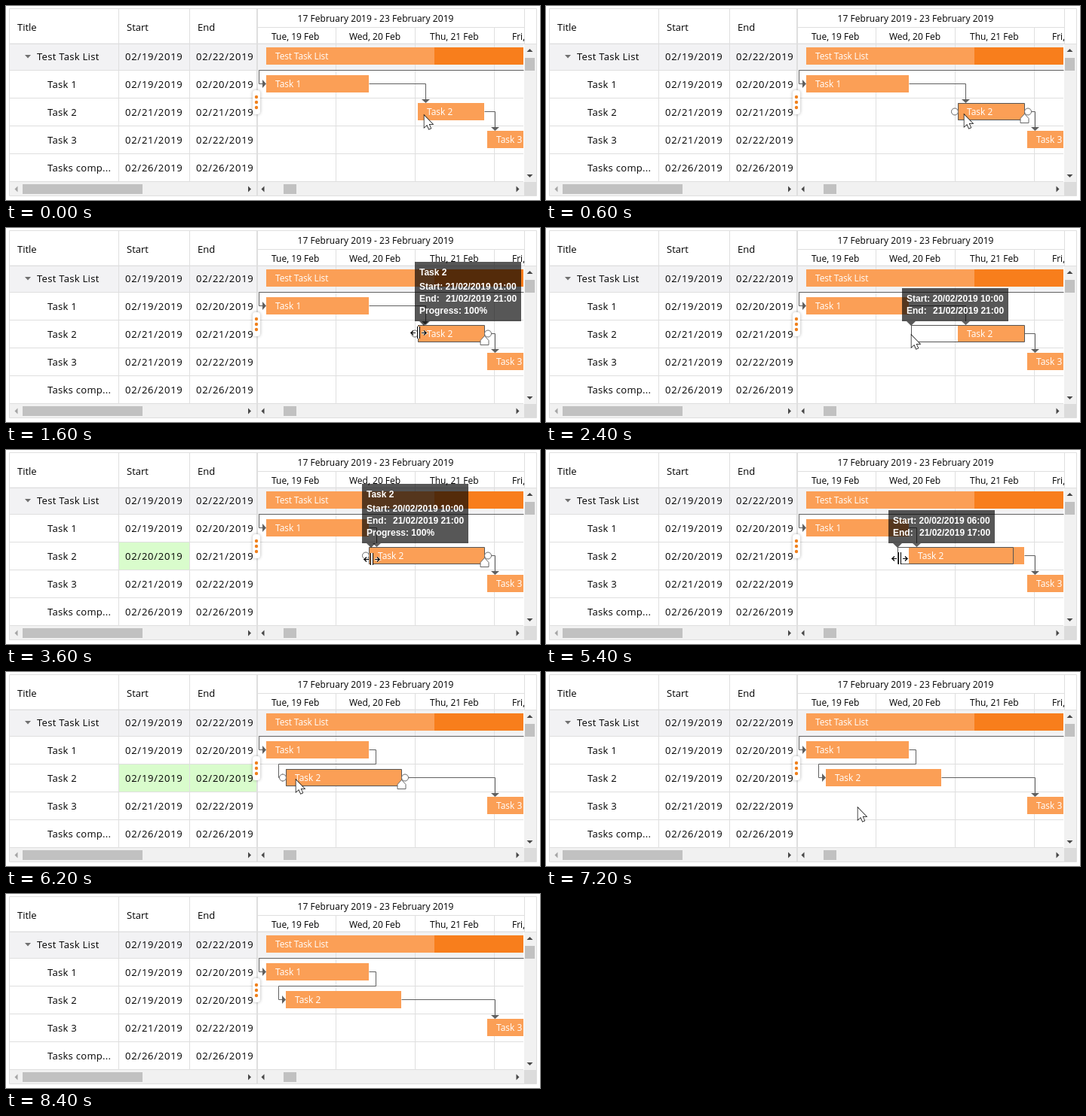
Recreate the animation shown at these times as an HTML page with a canvas. Size 708 by 258 pixels, loop 9200 ms.

```html
<!DOCTYPE html>
<html>
<head>
<meta charset="utf-8">
<style>
html, body { margin: 0; overflow: hidden; background: #fff; }
canvas { display: block; }
</style>
</head>
<body>
<canvas id="stage" width="708" height="258"></canvas>
<script>
const c = document.getElementById('stage').getContext('2d');
const LOOP = 9200, STEP = 200;
const UI = '"Open Sans", "Noto Sans", sans-serif';
const INK = '#000', LINE = '#dfdfdf', LINK = '#606060', LIGHT = '#fb9f56', DARK = '#f87e1c';

// Hours are counted from 19 February 00:00
const X = h => 331.5 + 4.385 * h;
const day = h => 19 + Math.floor(h / 24);
const pad = n => String(n).padStart(2, '0');
const gridDate = h => `02/${day(h)}/2019`;
const tipDate = h => `${day(h)}/02/2019 ${pad(Math.floor(h + 1e-6) % 24)}:00`;
const within = (t, a, b) => t >= a && t < b;

// Linear interpolation through [time, value, value...] points
function track(t, pts) {
  let i = 0;
  while (i < pts.length - 2 && t >= pts[i + 1][0]) i++;
  const p = pts[i], q = pts[i + 1];
  const k = Math.max(0, Math.min(1, (t - p[0]) / (q[0] - p[0])));
  return p.slice(1).map((v, n) => v + (q[n + 1] - v) * k);
}

const mouse = [
  [0, 554, 145], [800, 554, 143], [1400, 547, 139], [1600, 547, 139],
  [2000, 528, 140], [2400, 484, 142], [3000, 484, 143], [3600, 485, 145],
  [5000, 484, 145], [5400, 469, 144], [5800, 378, 143], [6200, 384, 143],
  [6400, 384, 144], [6800, 413, 180]
];
const resize = [[1600, 49], [2000, 44.5], [2400, 34.78]];
const move = [[5000, 34], [5400, 30.67], [5800, 9.8]];

function rect(x, y, w, h, fill) {
  c.fillStyle = fill;
  c.fillRect(x, y, w, h);
}

function text(s, x, y, font, fill, spacing = 0) {
  c.font = font;
  c.letterSpacing = spacing + 'px';
  c.fillStyle = fill;
  c.fillText(s, x, y);
}

function path(pts) {
  c.beginPath();
  pts.forEach(p => c.lineTo(p[0], p[1]));
}

function fill(color) {
  c.fillStyle = color;
  c.fill();
}

function stroke(color, width = 1) {
  c.strokeStyle = color;
  c.lineWidth = width;
  c.stroke();
}

// Triangle with its tip at x, y, pointing along dx, dy
function arrow(x, y, dx, dy, len, half, color) {
  const bx = x - dx * len, by = y - dy * len;
  path([[x, y], [bx + dy * half, by + dx * half], [bx - dy * half, by - dx * half]]);
  fill(color);
}

function link(pts) {
  path(pts.map(p => [p[0] + .5, p[1] + .5]));
  stroke(LINK);
}

function bar(from, to, y, label) {
  const x = Math.round(X(from));
  rect(x, y, Math.round(X(to)) - x, 23, LIGHT);
  text(label, x + 12, y + 16, '12px ' + UI, '#fff');
}

function outline(from, to) {
  const x = Math.round(X(from));
  c.beginPath();
  c.rect(x + .5, 129.5, Math.round(X(to)) - x, 22);
  stroke('#555');
}

function handles(from, to) {
  const l = Math.round(X(from)), r = Math.round(X(to));
  outline(from, to);
  for (const x of [l - 4, r + 5]) {
    c.beginPath();
    c.arc(x, 140.5, 4.5, 0, 7);
    fill('#fff');
    stroke('#666');
  }
  const m = r + .5;
  path([[m, 143.5], [m + 5.5, 149.5], [m + 5.5, 155.5], [m - 5.5, 155.5], [m - 5.5, 149.5]]);
  c.closePath();
  fill('#fff');
  stroke('#666');
}

function tooltip(x, from, to, full) {
  const left = Math.round(x) - 12, top = full ? 45 : 80;
  const bold = '600 12px "Liberation Sans", Arial, sans-serif';
  const shade = 'rgba(0,0,0,.66)';
  const put = (s, dx, y) => text(s, left + dx, y, bold, '#fff');
  rect(left, top, 141, 124 - top, shade);
  arrow(left + 12, 130, 0, 1, 6, 6, shade);
  const y = full ? 82 : 98, next = full ? 98 : 114;
  if (full) {
    put('Task 2', 6, 63);
    put('Progress: 100%', 6, 114);
  }
  put('Start:', 6, y);
  put(tipDate(from), 40.5, y);
  put('End:', 6, next);
  put(tipDate(to), 41, next);
}

function pointer(x, y) {
  const pts = [[0, 0], [0, 16], [3.7, 12.6], [6.3, 18.3], [8.8, 17.2], [6.3, 11.6], [11.2, 11.6]];
  path(pts.map(p => [x + p[0] + .5, y + p[1] + .5]));
  c.closePath();
  stroke('#000', 1.4);
  fill('#fff');
}

function resizer(x, y) {
  rect(x - 2, y - 8, 4, 16, '#fff');
  rect(x - 2, y - 8, 1, 16, '#000');
  rect(x + 1, y - 8, 1, 16, '#000');
  for (const d of [-1, 1]) {
    path([[4, 0], [10, 0], [7, -3], [10, 0], [7, 3]].map(p => [x + d * p[0], y + p[1] + .5]));
    stroke('#fff', 2.4);
    stroke('#000', 1.2);
  }
}

function grid(start, end, green, greenEnd) {
  rect(5, 49, 682, 36, '#f2f2f4');
  if (green > 0) {
    c.globalAlpha = green;
    rect(150, 123, greenEnd ? 182 : 93, 36, '#d9fccc');
    c.globalAlpha = 1;
  }
  for (const y of [85, 122, 159, 196, 233]) rect(5, y, 682, 1, LINE);
  rect(5, 50, 698, 1, LINE);
  for (const x of [149, 243]) rect(x, 4, 1, 230, LINE);

  const font = '13px ' + UI;
  [['Title', 15], ['Start', 160], ['End', 254]].forEach(h => text(h[0], h[1], 33, font, INK));
  const rows = [
    ['Test Task List', 0, 72], ['Task 1', 3, 34], ['Task 2', start, end],
    ['Task 3', 70, 72], ['Tasks comp...', 168, 168]
  ];
  rows.forEach(([name, a, b], i) => {
    const y = 72 + 37 * i;
    text(name, i ? 55 : 41, y, font, INK, .3);
    text(gridDate(a), 158, y, font, INK, .75);
    text(gridDate(b), 252, y, font, INK, .75);
  });
  arrow(29, 69.5, 0, 1, 4.5, 4, '#707070');
}

function chart(start, end) {
  c.save();
  c.beginPath();
  c.rect(333, 4, 354, 230);
  c.clip();
  rect(333, 28, 354, 1, LINE);
  for (const x of [437, 542, 647]) rect(x, 28, 1, 206, LINE);
  const font = '12px ' + UI;
  text('17 February 2019 - 23 February 2019', 386.5, 21, font, INK, .05);
  [['Tue, 19', 352], ['Wed, 20', 455], ['Thu, 21', 562], ['Fri, 22', 671]]
    .forEach(d => text(d[0] + ' Feb', d[1], 45, font, INK));

  rect(345, 55, 223, 23, LIGHT);
  rect(568, 55, 118, 23, DARK);
  text('Test Task List', 357, 71, font, '#fff', -.15);
  bar(3, 34, 92, 'Task 1');
  bar(start, end, 129, 'Task 2');
  bar(70, 82, 166, 'Task 3');
  rect(686, 51, 1, 183, '#fff');

  link([[686, 85], [335, 85], [335, 103], [341, 103]]);
  arrow(345, 103.5, 1, 0, 5, 5.5, LINK);
  const x = Math.round(X(start));
  if (start >= 34) {
    link([[481, 103], [x + 10, 103], [x + 10, 125]]);
    arrow(x + 10.5, 129, 0, 1, 5, 5.5, LINK);
  } else {
    link([[481, 103], [490, 103], [490, 122], [x - 10, 122], [x - 10, 140], [x - 4, 140]]);
    arrow(x, 140.5, 1, 0, 5, 5.5, LINK);
  }
  link([[Math.round(X(end)), 140], [648, 140], [648, 162]]);
  arrow(648.5, 166, 0, 1, 5, 5.5, LINK);
  c.restore();
}

function frameParts() {
  const groove = '#f1f1f1', thumb = '#c1c1c1', dark = '#484848';
  rect(5, 234, 682, 18, groove);
  rect(22, 237, 159, 13, thumb);
  rect(368, 237, 17, 13, thumb);
  arrow(11.5, 243.5, -1, 0, 4, 4, '#a5a5a5');
  arrow(325, 243.5, 1, 0, 4, 4, dark);
  arrow(338.5, 243.5, -1, 0, 4, 4, dark);
  arrow(680.5, 243.5, 1, 0, 4, 4, dark);
  rect(687, 51, 16, 183, groove);
  rect(688, 69, 13, 17, thumb);
  arrow(694.5, 57, 0, -1, 4, 4, dark);
  arrow(694.5, 228, 0, 1, 4, 4, dark);
  rect(687, 234, 16, 18, '#dcdcdc');
  rect(687, 4, 1, 47, LINE);
  rect(332, 4, 2, 248, LINE);
  c.beginPath();
  c.rect(4.5, 3.5, 699, 249);
  stroke(LINE);

  c.save();
  c.shadowColor = 'rgba(0,0,0,.3)';
  c.shadowBlur = 4;
  c.beginPath();
  c.roundRect(327, 112, 10, 32, 4);
  fill('#fff');
  c.restore();
  for (const y of [121, 128, 135]) {
    c.beginPath();
    c.arc(332, y, 2.2, 0, 7);
    fill('#f0801c');
  }
}

// Quick rise, short hold, then fade after a drop
const glow = age => age < 0 ? 0 : Math.max(0, Math.min(1, age / 400, (1100 - age) / 400));

function draw(t) {
  const start = t < 3000 ? 49 : t < 5800 ? 34 : 9;
  const end = t < 5800 ? 69 : 44;
  const moved = t >= 5800;
  c.clearRect(0, 0, 708, 258);
  grid(start, end, glow(t - (moved ? 5800 : 3000)), moved);
  chart(start, end);
  frameParts();

  if (within(t, 200, 1800) || within(t, 3000, 5000) || within(t, 5800, 6600)) handles(start, end);
  if (within(t, 800, 1800)) tooltip(554, start, end, true);
  if (within(t, 3400, 5000)) tooltip(484, start, end, true);
  if (within(t, 1800, 3000) || within(t, 5000, 5800)) {
    const [from] = track(t, t < 3000 ? resize : move);
    const to = t < 3000 ? end : from + 35;
    outline(from, to);
    tooltip(X(from), from, to, false);
  }

  if (t < 8400) {
    const [x, y] = track(t, mouse).map(Math.round);
    const wide = within(t, 1200, 2400) || within(t, 3200, 5800);
    (wide ? resizer : pointer)(x, y);
  }
}

const begin = performance.now();
function tick() {
  const t = (performance.now() - begin) % LOOP;
  draw(Math.floor(t / STEP) * STEP);
  requestAnimationFrame(tick);
}
tick();
</script>
</body>
</html>
```
